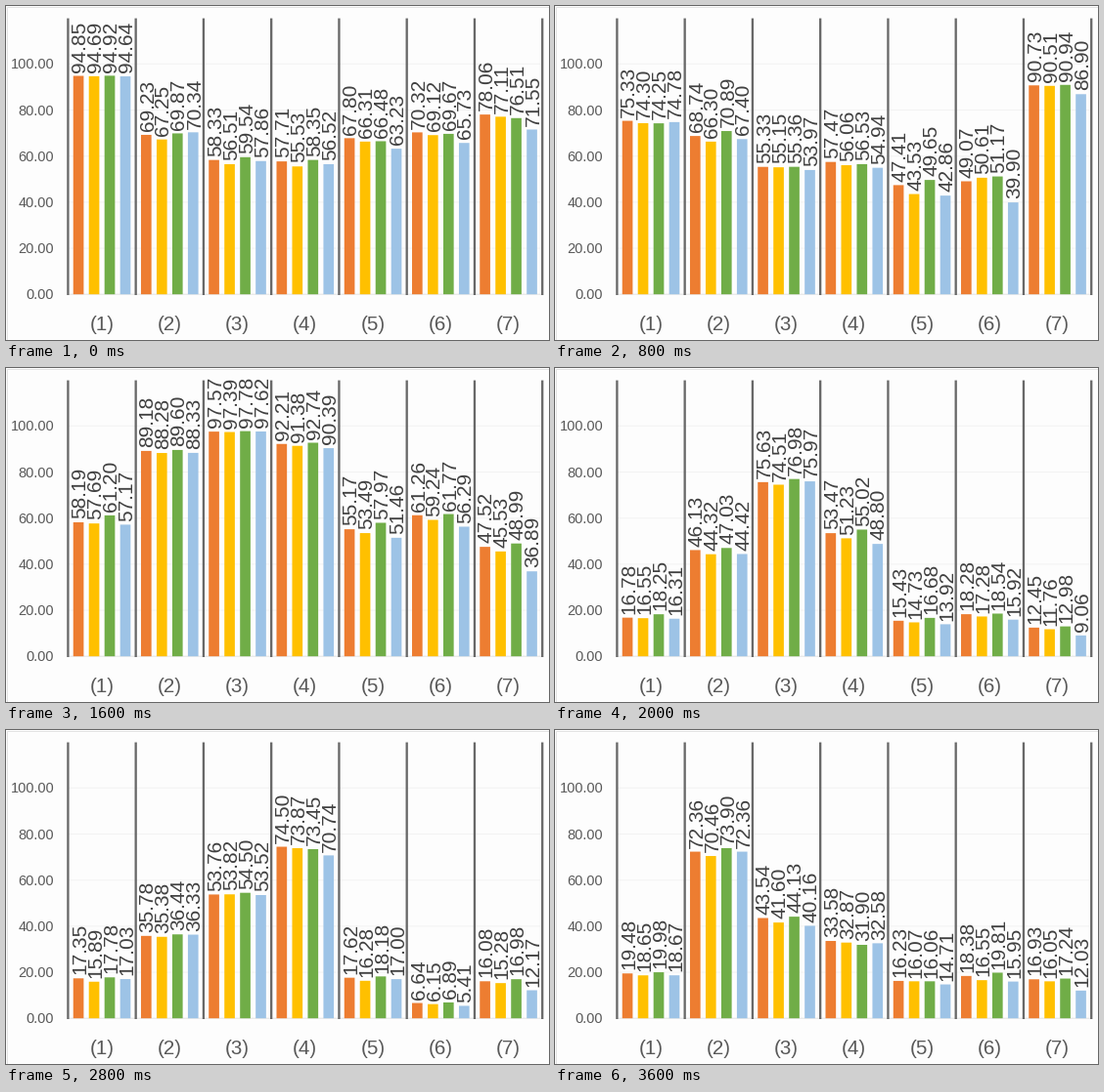
A matplotlib script for the animation above (4000 ms loop, 555 by 342 pixels).

```python
import numpy as np
import matplotlib.pyplot as plt
from matplotlib.animation import FuncAnimation
from matplotlib.patches import Rectangle

W, H, DPI = 555, 342, 64
LEFT, RIGHT, TOP, BASE = 63.4, 548.2, 12.6, 295.2
UNIT = 2.358                       # pixels per value unit
CATS, SERIES = 7, 4
CAT_W = (RIGHT - LEFT) / CATS
BAR_W = CAT_W / 6.5                # bars half a width apart
COLORS = ["#ED7D31", "#FFC000", "#70AD47", "#9DC3E6"]
GREY, DARK = "#595959", "#404040"

plt.rcParams["font.family"] = "Liberation Sans"
rng = np.random.default_rng(7)


def logit(percent):
    return np.log(percent / (100 - percent))


def percent(x):
    return 100 / (1 + np.exp(-x))


def chart_pair(levels, base=2.3, slope=1.23):
    """Loose and strict scores, grown from the first series' strict levels."""
    c = np.linspace(0, 1, CATS)
    drift = np.stack([0 * c, 0 * c - 0.05, 0 * c + 0.03, -0.35 * c**2], axis=1)
    noise = rng.normal(0, 0.05, (CATS, SERIES))
    noise[:, 0] = 0
    strict = logit(np.array(levels))[:, None] + drift + noise
    return percent(base + slope * strict), percent(strict)


# Each pair peaks in a different category.
slides = [
    *chart_pair([71.86, 20.64, 13.44, 13.12, 19.48, 21.57, 29.97], 2.05, 0.92),
    *chart_pair([27.64, 22.63, 15.50, 16.45, 12.41, 13.01, 49.61]),
    *chart_pair([16.78, 46.13, 75.63, 53.47, 15.43, 18.28, 12.45]),
    *chart_pair([17.35, 35.78, 53.76, 74.50, 17.62, 6.64, 16.08]),
    *chart_pair([19.48, 72.36, 43.54, 33.58, 16.23, 18.38, 16.93]),
]

fig = plt.figure(figsize=(W / DPI, H / DPI), dpi=DPI, facecolor="#FDFDFD")
ax = fig.add_axes([0, 0, 1, 1])
ax.set(xlim=(0, W), ylim=(H, 0))
ax.axis("off")


def pt(px):
    return px * 72 / DPI


def line(xs, ys, color, width, z):
    ax.plot(xs, ys, color=color, lw=pt(width), solid_capstyle="butt",
            snap=False, zorder=z)


def text(x, y, s, size, color, **kw):
    return ax.text(x, y, s, fontsize=pt(size), color=color, va="baseline",
                   zorder=5, **kw)


ax.add_patch(Rectangle((0.5, 0.5), W - 1, H - 1, fill=False,
                       ec="#E3E3E3", lw=pt(1)))
for v in range(0, 101, 20):
    y = BASE - v * UNIT
    line([LEFT, RIGHT], [y, y], "#F3F3F3" if v else "#E2E2E2", 1, 1)
    text(49, y + 5, f"{v:.2f}", 14.5, GREY, ha="right")
for c in range(CATS + 1):
    x = LEFT + c * CAT_W
    line([x, x], [TOP, BASE + 0.8], "#686868", 2.3, 3)
    if c < CATS:
        text(x + CAT_W / 2, 332, f"({c + 1})", 20.5, GREY, ha="center")

bars, labels = [], []
for c in range(CATS):
    for s in range(SERIES):
        x = LEFT + c * CAT_W + BAR_W * (0.5 + 1.5 * s)
        bars.append(ax.add_patch(Rectangle((x, BASE), BAR_W, 0, lw=0,
                                           fc=COLORS[s], snap=False,
                                           zorder=2)))
        labels.append(text(x + BAR_W / 2 + 7.2, BASE, "", 20.9, DARK,
                           rotation=90, rotation_mode="anchor", ha="left"))


def update(i):
    for bar, label, v in zip(bars, labels, slides[i].flat):
        bar.set_height(-v * UNIT)
        label.set_y(BASE - v * UNIT - 3.8)
        label.set_text(f"{v:.2f}")
    return bars + labels


anim = FuncAnimation(fig, update, frames=len(slides), interval=400,
                     repeat=True, repeat_delay=0, blit=False)
plt.show()
```
